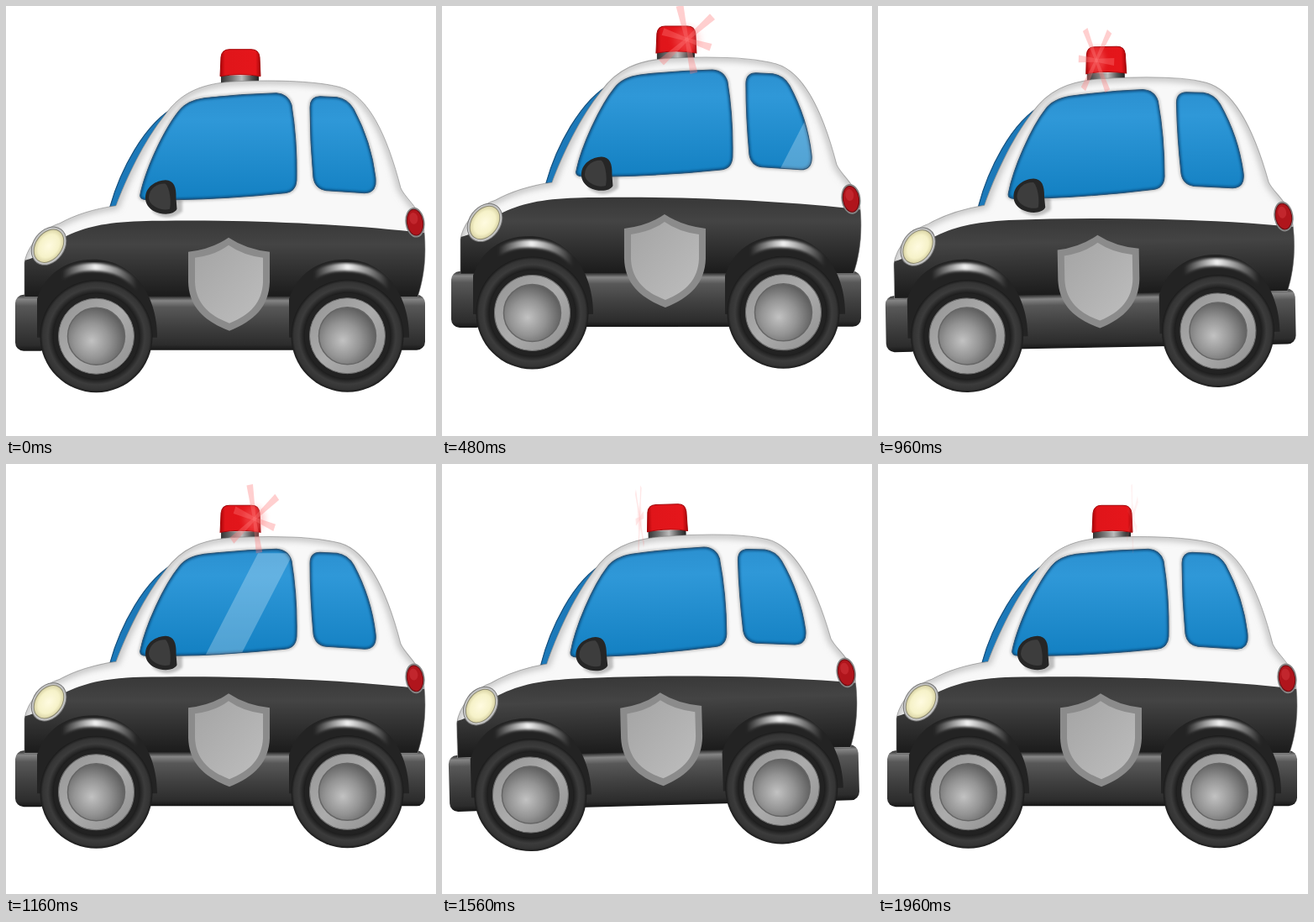
An HTML page that plays this animation: 512 by 512 pixels, repeating every 2 s.

```html
<!DOCTYPE html>
<html lang="en">
<head>
<meta charset="utf-8">
<title>Patrol car</title>
<style>
html, body { margin: 0; width: 100%; height: 100%; overflow: hidden; background: #fff; }
svg { display: block; width: 100%; height: 100%; }
</style>
</head>
<body>
<svg viewBox="0 0 512 512">
  <defs>
    <linearGradient id="glass" x2="0" y2="1">
      <stop stop-color="#2b90d0"/><stop offset=".25" stop-color="#2f98d8"/><stop offset="1" stop-color="#1380c2"/>
    </linearGradient>
    <linearGradient id="red">
      <stop stop-color="#a80408"/><stop offset=".12" stop-color="#e0151a"/>
      <stop offset=".88" stop-color="#e5161b"/><stop offset="1" stop-color="#a80408"/>
    </linearGradient>
    <linearGradient id="metal">
      <stop stop-color="#333"/><stop offset=".3" stop-color="#777"/><stop offset=".55" stop-color="#bbb"/>
      <stop offset=".8" stop-color="#555"/><stop offset="1" stop-color="#222"/>
    </linearGradient>
    <linearGradient id="paint" x2="0" y2="1">
      <stop stop-color="#383838"/><stop offset=".3" stop-color="#444"/><stop offset="1" stop-color="#181818"/>
    </linearGradient>
    <linearGradient id="sill" x2="0" y2="1">
      <stop stop-color="#2a2a2a"/><stop offset=".08" stop-color="#858585"/><stop offset=".2" stop-color="#585858"/>
      <stop offset=".55" stop-color="#404040"/><stop offset=".9" stop-color="#2c2c2c"/><stop offset="1" stop-color="#161616"/>
    </linearGradient>
    <linearGradient id="gleam">
      <stop offset=".05" stop-color="#fff" stop-opacity="0"/><stop offset=".45" stop-color="#fff" stop-opacity=".95"/>
      <stop offset=".95" stop-color="#fff" stop-opacity="0"/>
    </linearGradient>
    <radialGradient id="tyre">
      <stop offset=".76" stop-color="#1c1c1c"/><stop offset=".86" stop-color="#3c3c3c"/>
      <stop offset=".95" stop-color="#343434"/><stop offset="1" stop-color="#191919"/>
    </radialGradient>
    <linearGradient id="rim" x2="1" y2="1">
      <stop stop-color="#939393"/><stop offset=".5" stop-color="#acacac"/><stop offset="1" stop-color="#8f8f8f"/>
    </linearGradient>
    <radialGradient id="hub" cx=".42" cy=".58" r=".62">
      <stop stop-color="#c2c2c2"/><stop offset=".5" stop-color="#949494"/><stop offset="1" stop-color="#5a5a5a"/>
    </radialGradient>
    <radialGradient id="lamp">
      <stop stop-color="#fffbe0"/><stop offset=".7" stop-color="#f6f2c9"/><stop offset="1" stop-color="#d9d3a4"/>
    </radialGradient>
    <linearGradient id="badge" x2="1" y2="1">
      <stop stop-color="#a4a4a4"/><stop offset="1" stop-color="#bebebe"/>
    </linearGradient>
    <filter id="soft" x="-20%" y="-20%" width="140%" height="140%"><feGaussianBlur stdDeviation="4"/></filter>
    <filter id="fine" x="-20%" y="-20%" width="140%" height="140%"><feGaussianBlur stdDeviation="1.6"/></filter>

    <path id="shell" d="M22 305C25 285 44 264 64 258C82 248 104 241 131 237C143 205 164 160 190 128C208 103 232 91 275 89C325 87 372 89 398 96C432 106 454 154 470 216C477 231 495 240 498 268C501 300 497 325 490 346L22 346Z"/>
    <path id="windows" d="M160 223C166 194 188 146 206 124Q215 112 236 109Q280 104 322 103Q336 104 340 117Q347 160 346 207Q345 221 332 222Q265 229 203 230L168 230Q158 230 160 223ZM362 120Q362 107 374 107L394 108Q407 110 414 122Q435 161 440 204Q442 222 427 222L381 219Q368 217 366 204Q362 160 362 120Z"/>
    <clipPath id="inShell"><use href="#shell"/></clipPath>
    <clipPath id="inWindows"><use href="#windows"/></clipPath>

    <g id="fender">
      <path d="M-69 0V-46C-60 -75 -35 -93 -2 -93C41 -93 74 -56 74 0Z" fill="#232323"/>
      <path d="M-44 -70C-34 -79 -20 -84 -2 -84C22 -84 42 -74 55 -56" fill="none" stroke="url(#gleam)" stroke-width="9" filter="url(#fine)"/>
    </g>
    <g id="wheel">
      <circle r="67" fill="url(#tyre)"/>
      <circle r="51" fill="#222"/>
      <circle r="45" fill="url(#rim)" stroke="#6d6d6d"/>
      <circle r="34" fill="url(#hub)" stroke="#666" stroke-width="1.5"/>
    </g>
  </defs>

  <g id="car">
    <path d="M256 92V82H301V92Z" fill="url(#metal)"/>
    <path d="M255 83L256 60Q257 51 266 51H292Q301 51 302 60L303 83Q279 79 255 83Z" fill="url(#red)" stroke="#a3080b"/>
    <path d="M124 238C135 198 164 138 204 118L190 143L139 238Z" fill="#1c79b9" stroke="#184f7b" stroke-width="1.2"/>

    <rect x="11" y="343" width="40" height="67" rx="10" fill="url(#sill)"/>
    <rect x="455" y="343" width="44" height="66" rx="10" fill="url(#sill)"/>
    <use href="#shell" fill="#f8f8f8"/>
    <g clip-path="url(#inShell)">
      <use href="#shell" fill="none" stroke="#aaa" stroke-width="6" filter="url(#soft)"/>
      <path d="M18 303C36 300 52 289 68 275C94 262 118 257 160 255.500C270 253 400 258 502 270V350H18Z" fill="url(#paint)"/>
    </g>
    <use href="#shell" fill="none" stroke="#777" stroke-opacity=".55"/>
    <path d="M45 345H470V409H45Z" fill="url(#sill)"/>
    <use href="#fender" x="106" y="394"/>
    <use href="#fender" x="406" y="394"/>

    <use href="#windows" fill="none" stroke="#777" stroke-width="4" opacity=".4" filter="url(#fine)"/>
    <use href="#windows" fill="url(#glass)"/>
    <g clip-path="url(#inWindows)">
      <use href="#windows" fill="none" stroke="#0b4574" stroke-width="3" filter="url(#fine)"/>
      <path id="glint" d="M0 108H42L-24 236H-66Z" fill="#fff" opacity=".25"/>
    </g>
    <use href="#windows" fill="none" stroke="#2a5474"/>

    <path d="M174 244Q192 258 210 244V230H185Z" fill="#555" opacity=".35" filter="url(#fine)"/>
    <path d="M166 228C166 214 179 207 190 206.500C200 207 203 215 202.500 228L203.500 241C200 248 186 249 175 243C169 239 166 234 166 228Z" fill="#262626"/>
    <path d="M170 227C171 215 182 210 190 211C195 216 197 232 195 241C187 244 170 238 170 227Z" fill="#3d3d3d"/>

    <g transform="translate(51 285) rotate(36)">
      <ellipse rx="19" ry="25" fill="#777"/>
      <ellipse rx="18" ry="24" fill="#c4c4c4"/>
      <ellipse rx="15.5" ry="21.5" fill="url(#lamp)" stroke="#8e8b72"/>
    </g>
    <g transform="translate(487 257) rotate(-8)">
      <ellipse rx="11.5" ry="18" fill="#858585"/>
      <ellipse rx="9.5" ry="15.5" fill="#b0151c" stroke="#6d0b10"/>
      <ellipse cx="-1" cy="-5" rx="5" ry="7" fill="#d3383d" opacity=".5"/>
    </g>

    <path d="M217 292Q245 289 265 275Q286 289 314 292V328C313 357 296 374 266 386C235 374 218 357 217 328Z" fill="#8b8b8b"/>
    <path d="M225 299Q249 296 265 284Q282 296 306 299V328C305 352 291 367 266 377C240 367 226 352 225 328Z" fill="url(#badge)"/>

    <use href="#wheel" x="107.500" y="392.500"/>
    <use href="#wheel" x="406.500" y="392"/>
    <g id="flare" fill="#ff7a7a"></g>
  </g>
</svg>
<script>
const LOOP = 2000, STEP = 40;
const [car, glint, flare] = ["car", "glint", "flare"].map(id => document.getElementById(id));
const clamp = (v, lo = 0, hi = 1) => Math.min(hi, Math.max(lo, v));
const mix = (a, b, u) => a + (b - a) * clamp(u);

flare.innerHTML = '<circle r="15" opacity=".35" filter="url(#soft)"/>' +
  [0, 60, 120, 180, 240, 300].map((a, i) =>
    `<path d="M0 -2L${i % 3 ? 41 : 30} -4.5V4.5L0 2Z" opacity=".36" transform="rotate(${a})"/>`).join("");

// Rocking in degrees: soft start, slow decay, short settling
function tilt(t) {
  if (t < 253) return 0;
  const size = t < 1560 ? mix(3.6, 2.3, (t - 300) / 1260) : mix(2.3, 0, (t - 1560) / 190);
  return size * clamp((t - 253) / 90) ** 2 * Math.sin(Math.PI * (t - 253) / 226.7);
}

function lift(t) {
  const hop = 28 * (1 - ((t - 465) / 175) ** 2);
  return Math.max(hop, t > 600 ? 2.4 : 0);
}

function draw(t) {
  car.setAttribute("transform", `translate(0 ${0.7 - lift(t)}) rotate(${tilt(t)} 228 472)`);

  const shineX = t < 800 ? 327 + 0.67 * (t - 280) : 300 + 0.67 * (t - 1160);
  glint.setAttribute("transform", `translate(${shineX})`);

  // The flare circles the lamp, so it is narrow at both edges
  const start = t < 700 ? 115 : t < 1400 ? 765 : 1515;
  const u = clamp((t - start) / 460);
  const width = Math.min(1, u / 0.6, (1 - u) * 6);
  flare.setAttribute("transform", `translate(${240 + 65 * u} 67) scale(${width} 1) rotate(${mix(-12, 26, u)})`);
  flare.setAttribute("opacity", Math.min(1, u * 5, (1 - u) * 8));
}

function tick() {
  draw(Math.floor(performance.now() % LOOP / STEP) * STEP);
  requestAnimationFrame(tick);
}
tick();
</script>
</body>
</html>
```
